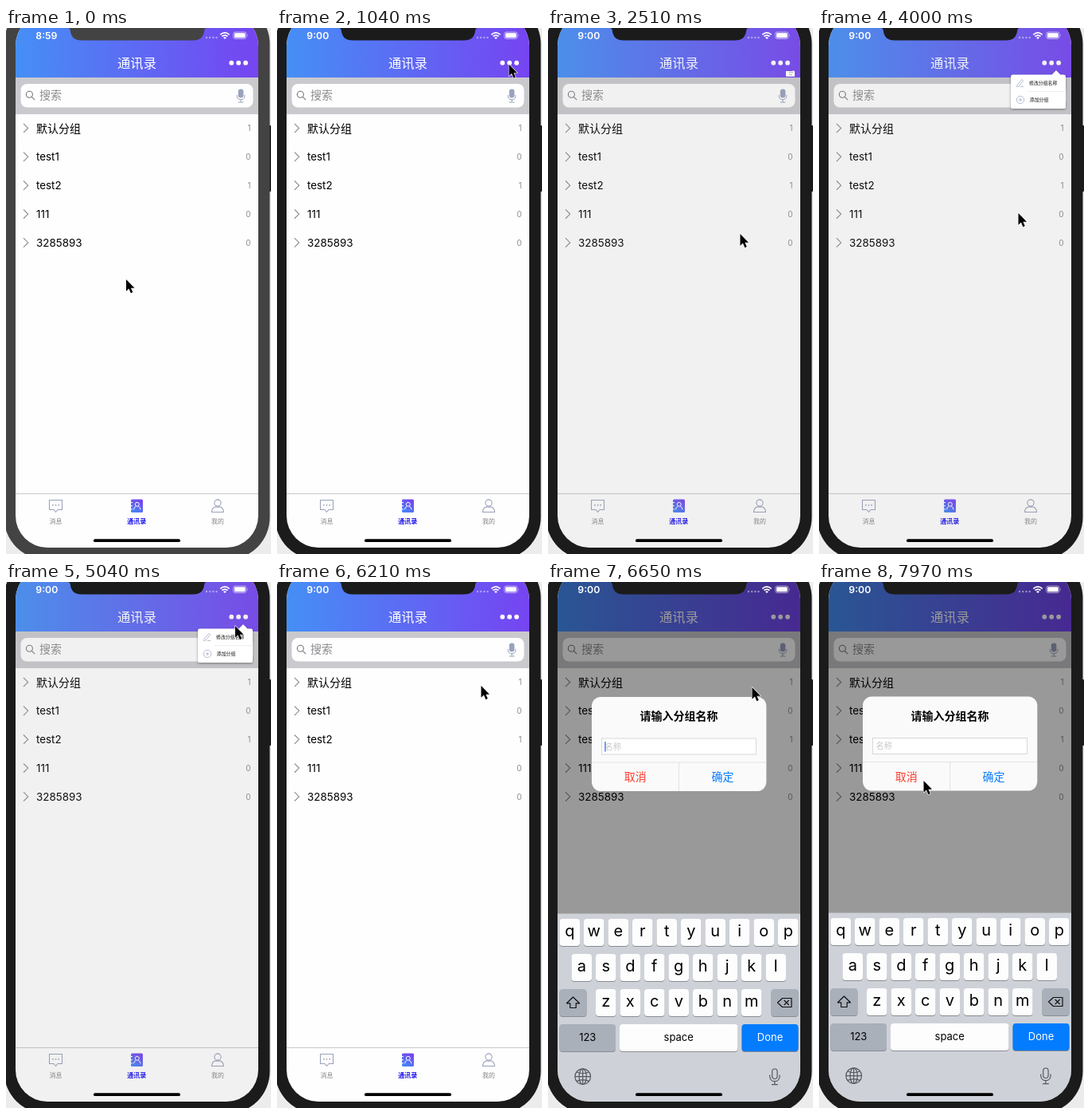
These frames come from a looping animation (333 px wide and 659 px high, 8000 ms). An HTML page:

```html
<!DOCTYPE html>
<html lang="zh-CN">
<head>
<meta charset="utf-8">
<title>通讯录</title>
<style>
html, body { margin: 0; width: 100%; height: 100%; overflow: hidden; background: #ececec; }
svg { display: block; width: 100%; height: 100%; }
text { font-family: Inter, "Noto Sans CJK SC", "Noto Sans CJK", sans-serif; }
</style>
</head>
<body>
<svg viewBox="0 0 333 659" xmlns="http://www.w3.org/2000/svg">
  <defs>
    <linearGradient id="bar"><stop stop-color="#458ff6"/><stop offset="1" stop-color="#7644f1"/></linearGradient>
    <linearGradient id="book" x1="0" y1="1" x2=".5" y2="0"><stop stop-color="#3f8df5"/><stop offset="1" stop-color="#7548ee"/></linearGradient>
    <clipPath id="screen"><rect x="12" y="-18" width="305" height="669" rx="40"/></clipPath>
    <filter id="soft" x="-20%" y="-20%" width="140%" height="150%"><feDropShadow dx="0" dy="1" stdDeviation="1.4" flood-opacity=".4"/></filter>
  </defs>
  <rect width="333" height="659" fill="#ececec"/>
  <rect x="329" y="122" width="4" height="83" rx="1" fill="#1b1b1b"/>
  <rect id="body" x="-2.5" y="-33" width="334" height="699" rx="53"/>
  <g clip-path="url(#screen)">
    <rect x="12" y="-18" width="305" height="669" fill="#fefefe"/>
    <rect x="12" y="-18" width="305" height="80" fill="url(#bar)"/>
    <text x="164.5" y="50" font-size="16.3" fill="#fff" text-anchor="middle">通讯录</text>
    <g id="dots" fill="#fff"><circle cx="283.3" cy="43.7" r="2.9"/><circle cx="292.2" cy="43.7" r="2.9"/><circle cx="301.1" cy="43.7" r="2.9"/></g>
    <rect x="12" y="62" width="305" height="46" fill="#c9c9ce"/>
    <rect x="18.5" y="70" width="292" height="29.5" rx="8" fill="#fefefe"/>
    <g fill="none" stroke="#77777d" stroke-width="1.1"><circle cx="29.4" cy="83.2" r="4"/><path d="M32.4 86.3l3.8 3.9"/></g>
    <text x="42" y="89.3" font-size="14" fill="#8a8a8f">搜索</text>
    <g fill="none" stroke="#98a2bd"><rect x="291.8" y="76.5" width="6.6" height="11" rx="3.3" fill="#98a2bd" stroke="none"/><path d="M290.3 84v1.5q.3 4 4.8 4.3q4.500-.3 4.800-4.300v-1.500M295.100 90v2.800M291.800 93h6.600"/></g>
    <g id="rows"></g>
    <path d="M12 583.500H317" stroke="#c9c9cd"/>
    <g fill="none" stroke="#9aa2ba" stroke-width="1.100" stroke-linejoin="round">
      <path d="M54.500 591.500h16v12h-5.500l-2.500 3l-2.500-3h-5.500z"/>
      <path d="M58 597.700h1.600M61.700 597.700h1.600M65.400 597.700h1.600" stroke-width="1.600"/>
      <circle cx="266" cy="595" r="4.100"/><path d="M258.500 606.500q.200-5.200 4.800-6.700q2.700 1 5.400 0q4.600 1.500 4.800 6.700z"/>
    </g>
    <rect x="157" y="590.500" width="15" height="16.500" rx="1.500" fill="url(#book)"/>
    <g fill="none" stroke="#fff"><circle cx="164.800" cy="596.800" r="2.500"/><path d="M160.500 603.300q.200-3 2.800-3.900M169 603.300q-.200-3-2.800-3.900M156.500 594.500h2.500M156.500 598.700h2.500M156.500 602.900h2.500"/></g>
    <g font-size="8" fill="#85858a" text-anchor="middle">
      <text x="62.500" y="620.500">消息</text><text x="266" y="620.500">我的</text>
      <text x="164.300" y="620.500" fill="#1a12f2" font-weight="700">通讯录</text>
    </g>
    <rect id="veil" x="12" y="-18" width="305" height="669" fill="#888"/>
    <g id="menu">
      <path d="M243.500 58.500H292.500L298 53L303.500 58.500H307.500Q310 58.500 310 61V98.500Q310 101 307.500 101H243.500Q241 101 241 98.500V61Q241 58.500 243.500 58.500Z" fill="#fff" filter="url(#soft)"/>
      <path d="M262 79.700H310" stroke="#e3e3e5" stroke-width=".7"/>
      <g fill="none" stroke="#a5adca" stroke-width=".8"><path d="M249 71.500l5.700-7l1.900 1.500l-5.700 7l-2.300.700zM253 73.500h4"/><circle cx="253" cy="90" r="4.700"/><path d="M250.800 90h4.400M253 87.800v4.400"/></g>
      <g font-size="5.900" fill="#111"><text x="264" y="71.300">修改分组名称</text><text x="264.800" y="92.300">添加分组</text></g>
    </g>
    <rect id="shade" x="12" y="-18" width="305" height="669"/>
    <g id="dialog">
      <rect x="55" y="143.500" width="219.300" height="118" rx="11.500" fill="#fafafa"/>
      <text x="164.500" y="172.800" font-size="14" font-weight="700" text-anchor="middle">请输入分组名称</text>
      <rect x="67.500" y="195.500" width="194" height="20" fill="#fff" stroke="#cfcfd1" stroke-width=".8"/>
      <text x="71.500" y="209.200" font-size="10.300" fill="#c7c7cc">名称</text>
      <path id="caret" d="M72 199.500V212" stroke="#3c64e8" stroke-width="1.300"/>
      <path d="M55 225.500H274.300M164.500 225.500V261.500" stroke="#dededf" stroke-width=".8"/>
      <g font-size="14" text-anchor="middle"><text x="109.700" y="248.800" fill="#ff3b30">取消</text><text x="219.500" y="248.800" fill="#0a7dfb">确定</text></g>
    </g>
    <g id="board">
      <rect x="12" y="414.500" width="305" height="240" fill="#ced2d8"/>
      <g id="keys"></g>
      <g fill="none" stroke="#111" stroke-width="1.200" stroke-linejoin="round">
        <path d="M31.500 519l8 7.800h-4.300v5.700h-7.400v-5.700h-4.300z"/>
        <path d="M294.500 520.500h11.500v11h-11.500l-6-5.500zM296.700 523l6 6M302.700 523l-6 6"/>
      </g>
      <g fill="none" stroke="#55585e" stroke-width="1.200">
        <circle cx="43.700" cy="618.700" r="9.800"/><ellipse cx="43.700" cy="618.700" rx="4.600" ry="9.800"/>
        <path d="M33.900 618.700h19.600M43.700 608.900v19.600M36 613q7.700 3.500 15.400 0M36 624.400q7.700-3.500 15.400 0"/>
        <rect x="281.700" y="609" width="6.400" height="12.500" rx="3.200"/><path d="M278.700 616.500v2q.500 6 6.200 6.200q5.700-.200 6.200-6.200v-2M284.900 624.700v3.800M281 628.700h7.800"/>
      </g>
    </g>
    <rect x="110" y="640.300" width="109" height="3.800" rx="1.900" fill="#000"/>
    <text id="clock" x="37.300" y="13.600" font-size="12.300" font-weight="600" fill="#fff"></text>
    <g fill="#fff">
      <g opacity=".45"><circle cx="252" cy="12" r="1.200"/><circle cx="256.200" cy="12" r="1.200"/><circle cx="260.400" cy="12" r="1.200"/><circle cx="264.600" cy="12" r="1.200"/></g>
      <g fill="none" stroke="#fff" stroke-width="1.700"><path d="M269.300 8.300q5.700-5 11.400 0M271.500 10.500q3.500-2.900 7 0"/></g>
      <path d="M273 12l2 2l2-2q-2-1.500-4 0z"/>
      <rect x="285.700" y="5" width="16.300" height="8.500" rx="2.400" fill="none" stroke="#fff" stroke-opacity=".6" stroke-width=".9"/>
      <rect x="287" y="6.300" width="13.700" height="5.900" rx="1.300"/><path d="M303.200 7.700v3q1.400-1.500 0-3z" opacity=".6"/>
    </g>
  </g>
  <path id="notch" d="M76 -1Q80.500 0 80.800 3Q82 15.500 95 15.500H235Q248 15.500 249.200 3Q249.500 0 254 -1Z"/>
  <path id="arrow" d="M0 0V14.800L3.400 11.600L5.900 17.200L8.300 16.100L5.900 10.700H10.500Z" fill="#000" stroke="#fff" stroke-width="1.200" stroke-linejoin="round" paint-order="stroke"/>
</svg>
<script>
const LOOP = 8000, TICK = 147.6;
const $ = id => document.getElementById(id);
const set = (id, attrs) => { for (const k in attrs) $(id).setAttribute(k, attrs[k]); };

const groups = [['默认分组', 1], ['test1', 0], ['test2', 1], ['111', 0], ['3285893', 0]];
$('rows').innerHTML = groups.map(([name, n], i) => {
  const y = 125.5 + i * 35.85, size = i ? 13.4 : 14;
  return `<path d="M22 ${y - 5.7}l5.700 5.700l-5.700 5.700" fill="none" stroke="#8a8a90" stroke-width="1.100"/>
    <text x="38" y="${y + 5}" font-size="${size}">${name}</text>
    <text x="307.500" y="${y + 3.7}" font-size="10" fill="#8c8c90" text-anchor="end">${n}</text>`;
}).join('');

function key(x, y, w, label, size, fill = '#fdfdfd', ink = '#000') {
  const base = size > 15 ? 22 : 21;
  return `<rect x="${x}" y="${y + 1}" width="${w}" height="34" rx="4" fill="#898c92"/>
    <rect x="${x}" y="${y}" width="${w}" height="34" rx="4" fill="${fill}"/>
    <text x="${x + w / 2}" y="${y + base}" font-size="${size}" fill="${ink}" text-anchor="middle">${label}</text>`;
}
const letters = (chars, x, y) => [...chars].map((c, i) => key(x + i * 30.5, y, 25.5, c, 20)).join('');
const gray = '#a9b0ba';
$('keys').innerHTML = letters('qwertyuiop', 14.5, 421) + letters('asdfghjkl', 29.5, 465) +
  letters('zxcvbnm', 60, 509) + key(14.5, 509, 34, '', 13, gray) + key(280.5, 509, 34, '', 13, gray) +
  key(14.5, 553, 70.5, '123', 13, gray) + key(90, 553, 148.5, 'space', 13) +
  key(243.5, 553, 71, 'Done', 13, '#047cff', '#fff');

// Tracks: [tick, values...], linear between entries
const pointer = [
  [0, 151, 315], [1, 151, 315], [3, 185, 245], [5, 275, 72], [6, 292, 46], [8, 291, 45], [9, 286, 64],
  [10, 263.5, 148], [11, 250, 212], [12, 244, 240], [14, 241.5, 258], [17, 241.5, 258], [18, 245, 235],
  [20, 290, 50], [21, 291, 45], [22, 272, 140], [23, 245, 246], [24, 221, 323], [26, 221, 323],
  [27, 250.5, 232], [29, 291, 48], [33, 291, 45], [34, 288, 55], [37, 270, 74], [38, 270, 74],
  [40, 264, 90], [42, 256.5, 130], [45, 256.5, 132], [46, 256.5, 132], [48, 205, 205], [50, 149, 247],
  [52, 149, 247], [54, 131.5, 249]
];
const menuSize = [
  [9, 0], [10, .58], [11, 1], [15, 1], [16, .7], [17, .16], [18, 0], [21, 0], [22, .58], [23, 1],
  [29, 1], [30, .5], [31, 0], [32, 0], [33, .58], [34, 1], [39, 1], [40, .6], [41, .16], [42, 0]
];
// share shown, distance left to travel
const sheet = [[42, 0, 1], [43, .5, .6], [44, .93, .1], [45, 1, .0042], [46, 1, 0]];

function at(track, n) {
  if (n <= track[0][0]) return track[0].slice(1);
  const i = track.findIndex(k => k[0] > n);
  if (i < 0) return track[track.length - 1].slice(1);
  const a = track[i - 1], b = track[i], p = (n - a[0]) / (b[0] - a[0]);
  return a.slice(1).map((v, j) => v + (b[j + 1] - v) * p);
}

function draw(t) {
  const n = Math.floor((t + 7) / TICK);
  const awake = n >= 7, dark = awake ? '#1b1b1b' : '#434343';
  set('body', { fill: dark });
  set('notch', { fill: dark });
  $('clock').textContent = awake ? '9:00' : '8:59';

  const [x, y] = at(pointer, n);
  set('arrow', { transform: `translate(${x} ${y})` });

  const [s] = at(menuSize, n);
  set('menu', { transform: `translate(310 53) scale(${s}) translate(-310 -53)`, display: s ? 'inline' : 'none' });
  set('veil', { opacity: .11 * Math.min(1, s * 7) });
  set('dots', { opacity: [9, 10, 21, 22, 33].includes(n) ? .5 : 1 });

  const [shown, left] = at(sheet, n);
  set('shade', { opacity: .4 * shown });
  set('board', { transform: `translate(0 ${left * 238})`, display: shown ? 'inline' : 'none' });
  const k = 1 + .15 * left;
  set('dialog', {
    opacity: shown,
    transform: `translate(164.500 ${202.5 + left * 120}) scale(${k}) translate(-164.500 -202.500)`
  });
  set('caret', { opacity: (n >= 45 && n < 48) || (n >= 50 && n < 53) ? 1 : 0 });
}

function loop() {
  draw(performance.now() % LOOP);
  requestAnimationFrame(loop);
}
loop();
</script>
</body>
</html>
```
